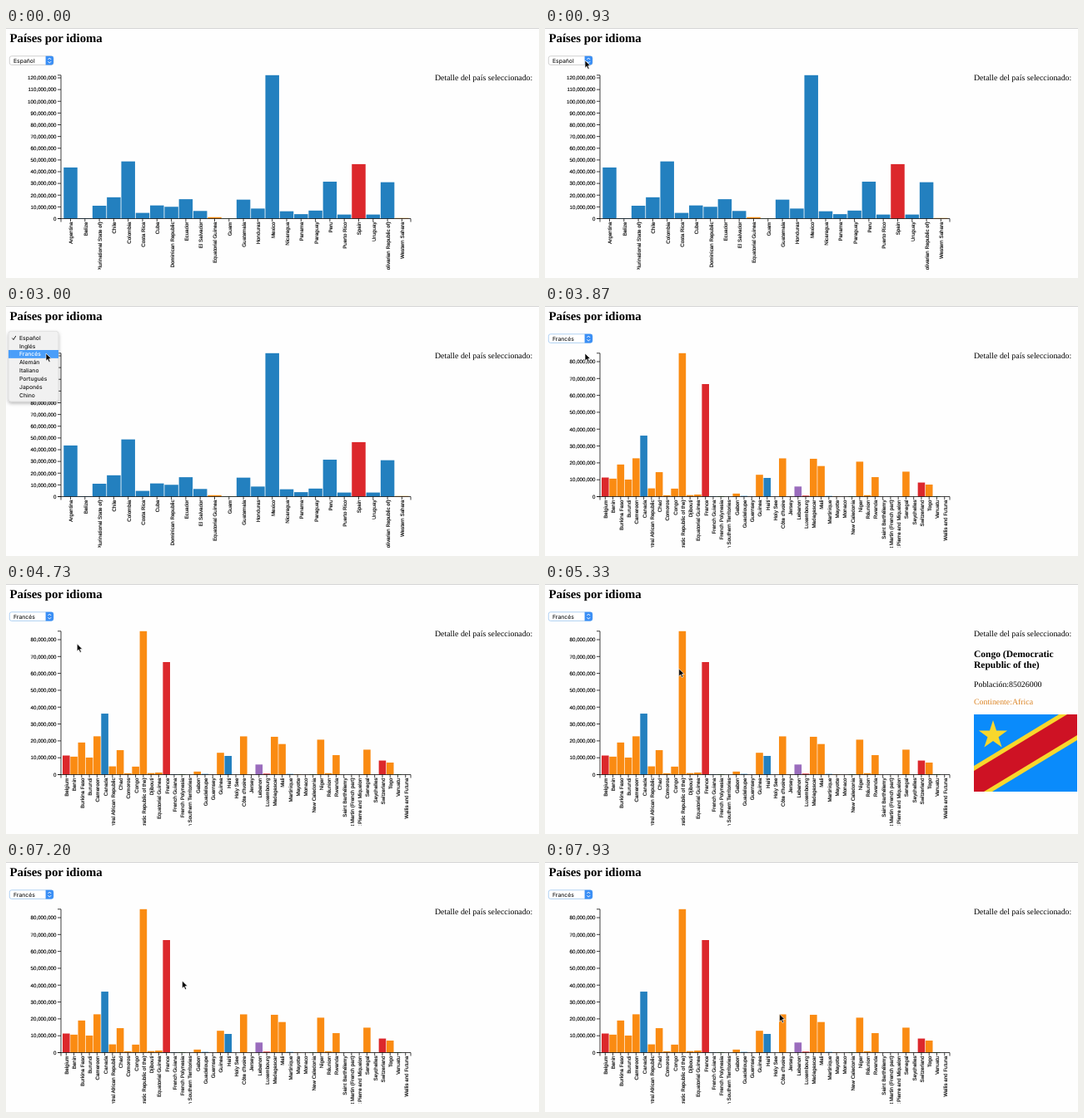
Write an HTML page that moves like this. It is 640 px wide and 301 px high and loops after 8000 ms.

```html
<!DOCTYPE html>
<html lang="es">
<head>
<meta charset="utf-8">
<title>Países por idioma</title>
<style>
  html, body { margin: 0; width: 100%; height: 100%; overflow: hidden; background: #fefefe; }
  svg { display: block; width: 640px; height: 301px; }
  text { white-space: pre; text-rendering: geometricPrecision; }
  .page { font: 9.85px "Liberation Serif", Times, serif; }
  .page .title { font-size: 14.75px; font-weight: bold; }
  .page .name { font-size: 11.52px; font-weight: bold; }
  .chart { font: 6.2px "Liberation Sans", Arial, sans-serif; text-anchor: end; }
  .chart text { stroke: #000; stroke-width: .14; }
  .chart path { fill: none; stroke: #000; stroke-width: .75; }
  .ui { font: 500 6.75px Inter, Roboto, sans-serif; fill: #1c1c1c; }
</style>
</head>
<body>
<svg viewBox="0 0 640 301">
  <defs>
    <clipPath id="chartArea"><rect width="640" height="291"/></clipPath>
    <filter id="shadow" x="-20%" y="-20%" width="140%" height="150%">
      <feDropShadow dx="0" dy="2" stdDeviation="2" flood-opacity=".3"/>
    </filter>
  </defs>
  <rect width="640" height="1" fill="#d4d4d4"/>
  <g class="page">
    <text class="title" x="4.5" y="17">Países por idioma</text>
    <text x="515" y="63">Detalle del país seleccionado:</text>
    <g id="details"></g>
  </g>
  <g id="charts" clip-path="url(#chartArea)"></g>
  <g id="select" class="ui">
    <rect id="frame" x="4.3" y="33.8" width="52.6" height="10.6" rx="2.4" fill="#fff" stroke-width=".8"/>
    <path d="M47.6 33.7h7a2.4 2.4 0 0 1 2.4 2.4v6a2.4 2.4 0 0 1 -2.4 2.4h-7z" fill="#3b8ff5"/>
    <path d="M50.5 38l1.8 -2 1.8 2M50.5 40.2l1.8 2 1.8 -2" fill="none" stroke="#fff" stroke-width=".9"/>
    <text id="chosen" x="9" y="41.5"></text>
  </g>
  <g id="menu" class="ui">
    <rect x="3" y="30.3" width="60" height="84.7" rx="3" fill="#f1f1f1" stroke="#cfcfcf" stroke-width=".5" filter="url(#shadow)"/>
    <rect id="highlight" x="3" width="60" height="9.85" fill="#4a9ef9"/>
    <path id="check" d="M7.4 38.6l1.6 2 2.8 -4.6" fill="none" stroke-width="1"/>
  </g>
  <path id="cursor" d="M0 0v9.2l2.1 -2 1.5 3.4 1.6 -.7 -1.5 -3.3h2.9z" fill="#000" stroke="#fff" stroke-width=".7"/>
</svg>
<script>
const LOOP = 8000, MENU_OPEN = 1800, MENU_PICK = 3640;
const LEFT = 66, RIGHT = 486, BASE = 229.5, HEIGHT = 172.7;
const MENU_TOP = 33.3, ROW = 9.85;
const colors = { m: '#2380bf', f: '#fa8b12', e: '#dc282c', s: '#9a6cbd', o: '#2ca02c' };
const languages = ['Español', 'Inglés', 'Francés', 'Alemán', 'Italiano', 'Portugués', 'Japonés', 'Chino'];

// Each entry: name, continent key, millions of people.
const parse = list => list.trim().split(/\s*;\s*/).map(entry => {
  const [, name, continent, millions] = entry.match(/^(.*) (\w) ([\d.]+)$/);
  return { name, continent, millions: +millions };
});

const spanish = parse(`Argentina m 43.59; Belize m .37; Bolivia (Plurinational State of) m 10.99; Chile m 18.19;
  Colombia m 48.76; Costa Rica m 4.89; Cuba m 11.24; Dominican Republic m 10.08; Ecuador m 16.55;
  El Salvador m 6.52; Equatorial Guinea f 1.22; Guam o .18; Guatemala m 16.18; Honduras m 8.58;
  Mexico m 122.27; Nicaragua m 6.26; Panama m 3.81; Paraguay m 6.85; Peru m 31.49; Puerto Rico m 3.47;
  Spain e 46.44; Uruguay m 3.48; Venezuela (Bolivarian Republic of) m 31.03; Western Sahara f .51`);

const french = parse(`Belgium e 11.32; Benin f 10.65; Burkina Faso f 19.03; Burundi f 10.11; Cameroon f 22.71;
  Canada m 36.16; Central African Republic f 4.89; Chad f 14.5; Comoros f .81; Congo f 4.74;
  Congo (Democratic Republic of the) f 85.026; Djibouti f .9; Equatorial Guinea f 1.22; France e 66.71;
  French Guiana m .25; French Polynesia o .27; French Southern Territories f 0; Gabon f 1.8;
  Guadeloupe m .4; Guernsey e .06; Guinea f 12.95; Haiti m 11.08; Holy See e 0; Côte d'Ivoire f 22.67;
  Jersey e .1; Lebanon s 5.99; Luxembourg e .58; Madagascar f 22.43; Mali f 18.13; Martinique m .38;
  Mayotte f .23; Monaco e .04; New Caledonia o .27; Niger f 20.72; Réunion f .84; Rwanda f 11.55;
  Saint Barthélemy m .01; Saint Martin (French part) m .04; Saint Pierre and Miquelon m .01;
  Senegal f 14.8; Seychelles f .09; Switzerland e 8.34; Togo f 7.14; Vanuatu o .28; Wallis and Futuna o .01`);

const star = Array.from({ length: 10 }, (_, i) => {
  const r = i % 2 ? 6.9 : 18, a = i * Math.PI / 5;
  return [23 + r * Math.sin(a), 25 - r * Math.cos(a)];
}).join(' ');

const details = {
  'Congo (Democratic Republic of the)': {
    lines: ['Congo (Democratic', 'Republic of the)'], population: 85026000, continent: 'Africa', color: '#dc8424',
    flag: `<rect width="124" height="93" fill="#0a8bfb"/>
      <path d="M0 62L102 0H124V31L22 93H0z" fill="#f8d72c"/>
      <path d="M0 68L112 0H124V25L12 93H0z" fill="#ce1224"/>
      <polygon points="${star}" fill="#f8d72c"/>`
  },
  France: {
    lines: ['France'], population: 66710000, continent: 'Europe', color: colors.e,
    flag: ['#0a2c97', '#fff', '#e92c3b'].map((c, i) =>
      `<rect x="${i * 41.33}" width="41.34" height="82.6" fill="${c}"/>`).join('')
  }
};

const $ = id => document.getElementById(id);
const show = (el, on) => el.style.display = on ? '' : 'none';

function buildChart(data, offset, band, barWidth) {
  const max = Math.max(...data.map(d => d.millions));
  const y = millions => BASE - millions * HEIGHT / max;
  const top = y(max);
  let axis = `M${LEFT - 4} ${top}H${LEFT}V${BASE}H${LEFT - 4}M${LEFT} ${BASE + 4}V${BASE}H${RIGHT}V${BASE + 4}`;
  let bars = '', labels = '';
  for (let v = 0; v <= max; v += 10) {
    axis += `M${LEFT - 4} ${y(v)}h4`;
    labels += `<text x="60.5" y="${y(v) + 2.3}">${(v * 1e6).toLocaleString('en-US')}</text>`;
  }
  const boxes = data.map((d, i) => {
    const center = offset + i * band, x = center - barWidth / 2, barTop = y(d.millions);
    bars += `<rect x="${x}" y="${barTop}" width="${barWidth}" height="${BASE - barTop}" fill="${colors[d.continent]}"/>`;
    axis += `M${center} ${BASE}v3.7`;
    labels += `<text transform="translate(${center + 2.9} 233.5) rotate(-90)">${d.name}</text>`;
    return { name: d.name, x, right: x + barWidth, top: barTop };
  });
  $('charts').insertAdjacentHTML('beforeend', `<g class="chart">${bars}<path d="${axis}"/>${labels}</g>`);
  return { group: $('charts').lastElementChild, boxes };
}

function buildDetail({ lines, population, continent, color, flag }) {
  const shift = (lines.length - 2) * 13.4;
  const names = lines.map((line, i) => `<text class="name" x="515" y="${87.5 + i * 13.4}">${line}</text>`).join('');
  $('details').insertAdjacentHTML('beforeend', `<g>${names}<g transform="translate(515 ${shift})">
    <text y="124">Población:${population}</text>
    <text y="145" fill="${color}">Continente:${continent}</text>
    <g transform="translate(0 157)">${flag}</g></g></g>`);
  return $('details').lastElementChild;
}

const spanishChart = buildChart(spanish, 77.5, 17.3, 16.5);
const frenchChart = buildChart(french, 72.3, 9.26, 8.6);
const detailGroups = Object.entries(details).map(([name, d]) => [name, buildDetail(d)]);
const items = languages.map((name, i) => {
  $('menu').insertAdjacentHTML('beforeend', `<text x="16" y="${40.7 + i * ROW}">${name}</text>`);
  return $('menu').lastElementChild;
});

// Pointer stops: time, x, y.
const stops = [
  [200, 190, 301], [870, 48, 39], [2600, 48, 39], [2950, 48, 57], [4500, 48, 57], [5100, 160.7, 102],
  [5650, 160.7, 102], [6100, 174.5, 122.5], [6500, 174.5, 122.5], [6780, 192, 132], [7000, 194, 133], [7700, 281.5, 183]
];

function pointerAt(t) {
  const next = stops.findIndex(s => s[0] > t);
  if (next <= 0) return stops.at(next).slice(1);
  const [t0, x0, y0] = stops[next - 1], [t1, x1, y1] = stops[next];
  const u = (t - t0) / (t1 - t0), k = u * u * (3 - 2 * u);
  return [x0 + (x1 - x0) * k, y0 + (y1 - y0) * k];
}

function draw(t) {
  const picked = t >= MENU_PICK, open = t >= MENU_OPEN && !picked;
  const [x, y] = pointerAt(t);
  show(spanishChart.group, !picked);
  show(frenchChart.group, picked);
  show($('select'), !open);
  show($('menu'), open);
  $('chosen').textContent = languages[picked ? 2 : 0];
  $('frame').setAttribute('stroke', picked ? '#9cc6f0' : '#c4c4c4');

  const row = Math.floor((y - MENU_TOP) / ROW);
  $('highlight').setAttribute('y', MENU_TOP + row * ROW);
  $('check').setAttribute('stroke', row === 0 ? '#fff' : '#222');
  items.forEach((item, i) => item.setAttribute('fill', i === row ? '#fff' : '#1c1c1c'));

  const hovered = picked && frenchChart.boxes.find(b => x >= b.x && x <= b.right && y >= b.top && y <= BASE);
  detailGroups.forEach(([name, group]) => show(group, hovered && hovered.name === name));

  show($('cursor'), t >= stops[0][0]);
  $('cursor').setAttribute('transform', `translate(${x} ${y})`);
}

const start = performance.now();
function tick() {
  draw((performance.now() - start) % LOOP);
  requestAnimationFrame(tick);
}
tick();
</script>
</body>
</html>
```
